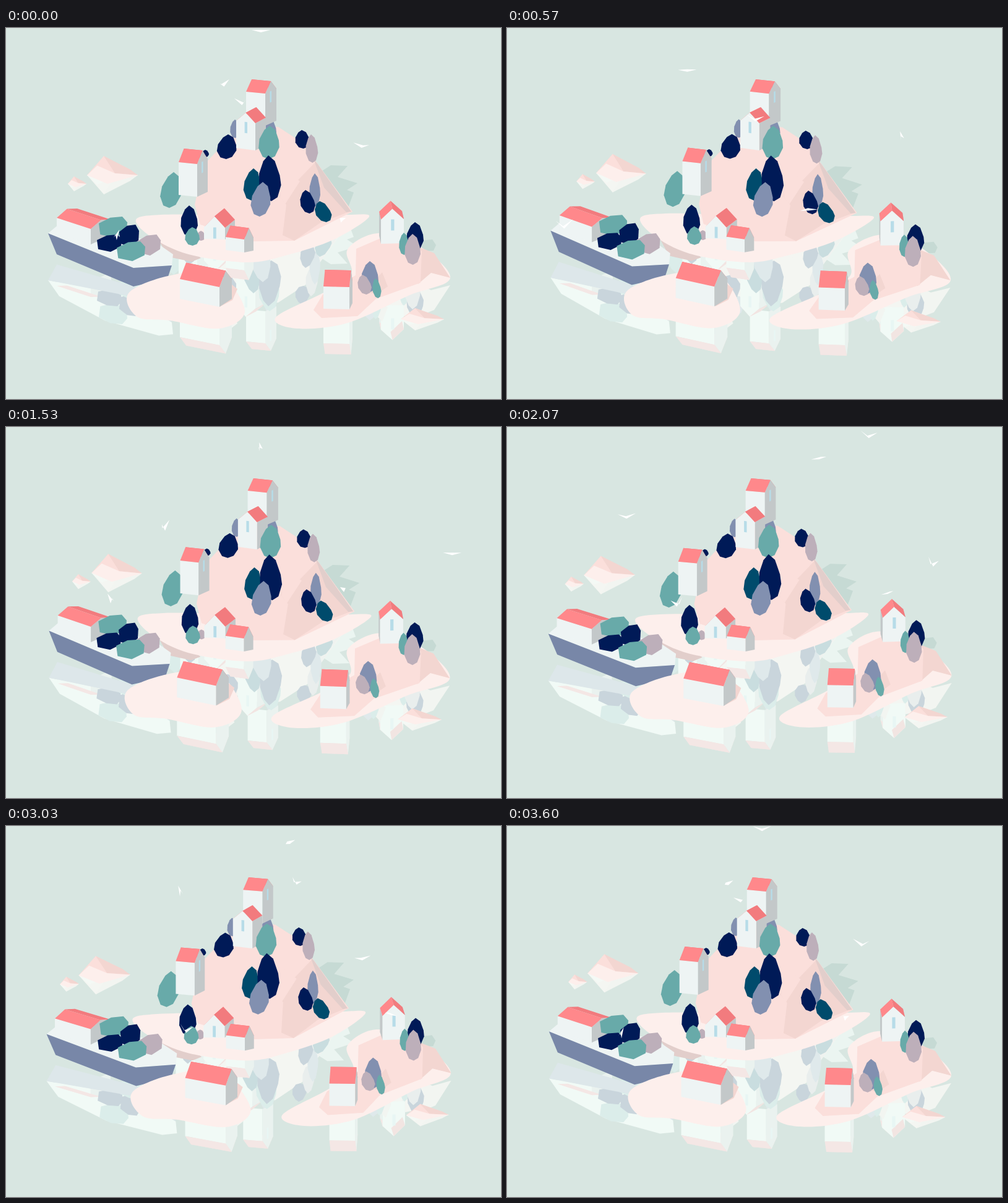
These frames come from a looping animation (800x600 px, 3.63 s). An HTML page with a canvas:

```html
<!DOCTYPE html>
<html lang="en">
<meta charset="utf-8">
<title>Islands</title>
<style>
  html, body { margin: 0; width: 100%; height: 100%; overflow: hidden; background: #d8e6e1 }
  canvas { display: block }
</style>
<canvas id="stage" width="800" height="600"></canvas>
<script>
const ctx = document.getElementById('stage').getContext('2d');
const LOOP = 3630, WATER = '#d8e6e1', PALE = '#f2fbf7';
const C = {
  sand: '#fdefec', hill: '#fbdfdb', shade: '#f3d6d1', dusk: '#e2cecb', roof: '#ff888b', roofDark: '#f27b7e',
  wall: '#eef4f4', side: '#c3c8c9', window: '#b7dce8', navy: '#001a57', teal: '#68aaa9',
  slate: '#8290b0', mauve: '#bdafba', deep: '#004b6c', hull: '#7887a8', haze: '#c6dad4'
};

// Every vertex is [x, g, h]: g is the screen line of the water below it, h its height above that line
const faces = [];
const face = (color, points, smooth = false) => faces.push({
  color: C[color], reflection: mix(C[color], PALE, .83), points, smooth,
  raised: points.some(p => p[2] > 0)
});

function mix(a, b, amount) {
  const channel = (hex, i) => parseInt(hex.substr(1 + 2 * i, 2), 16);
  return `rgb(${[0, 1, 2].map(i => Math.round(channel(a, i) * (1 - amount) + channel(b, i) * amount))})`;
}

const pairs = text => text.split(' ').map(pair => pair.split(',').map(Number));

// Outline drawn on screen, standing on a waterline that may slope with x
function poly(color, line, text, slope = 0) {
  const outline = pairs(text), left = outline[0][0];
  face(color, outline.map(([x, y]) => {
    const g = Math.max(y, line + slope * (x - left));
    return [x, g, g - y];
  }));
}
const island = text => face('sand', pairs(text).map(([x, y]) => [x, Math.max(y, 302), 0]), true);

// Unit silhouettes scaled into place
const EGG = pairs('0,-1 .55,-.76 .93,-.12 1,.3 .62,.83 .05,1 -.55,.86 -.97,.35 -.92,-.2 -.48,-.75');
const CRATE = pairs('-1,-.35 -.2,-.9 .65,-1 1,-.45 .95,.4 .1,1 -.9,.7');
const stamp = (shape, color, line, x, y, rx, ry, lean = 0) =>
  face(color, shape.map(([u, v]) => [x + u * rx - v * lean, line, line - y - v * ry]));
const tree = (...args) => stamp(EGG, ...args);
const crate = (color, ...args) => stamp(CRATE, color, 392, ...args);

// Gabled box from its near corner; `long` runs along the ridge, `gable` across it
function house(x, y, lift, long, gable, wall, rise, window = true, gableLit = false) {
  const at = (l, w, h) => [x + l * long[0] + w * gable[0], y + lift + l * long[1] + w * gable[1], lift + h];
  const [longColor, gableColor] = gableLit ? ['side', 'wall'] : ['wall', 'side'];
  const top = wall + rise;
  if (long[0] * gable[0] > 0) face('side', [at(0, 1, 0), at(1, 1, 0), at(1, 1, wall), at(0, 1, wall)]);
  face(gableLit ? 'roof' : 'roofDark', [at(0, 1, wall), at(1, 1, wall), at(1, .5, top), at(0, .5, top)]);
  face(longColor, [at(0, 0, 0), at(1, 0, 0), at(1, 0, wall), at(0, 0, wall)]);
  face(gableColor, [at(0, 0, 0), at(0, 1, 0), at(0, 1, wall), at(0, .5, top), at(0, 0, wall)]);
  face(gableLit ? 'roofDark' : 'roof', [at(0, 0, wall), at(1, 0, wall), at(1, .5, top), at(0, .5, top)]);
  if (window) {
    const low = wall - 18, high = wall;
    face('window', [at(0, .42, low), at(0, .56, low), at(0, .56, high), at(0, .42, high)]);
  }
}

function rock(x, y, w, rise) {
  const at = (u, v) => [x + u * w, y, -v * rise];
  face('hill', [at(-1, 0), at(-.34, -1), at(1, 0)]);
  face('shade', [at(-.34, -1), at(.7, -.3), at(1, 0), at(.1, -.1)]);
  face('sand', [at(-1, 0), at(-.6, -.5), at(.1, -.1), at(1, 0), at(-.2, .45)]);
}

rock(172, 238, 41, 31);
rock(115, 252, 15, 12);

// Main island
poly('haze', 302, '500,238 525,222 552,223 536,241 568,251 551,262 562,266 553,290');
poly('dusk', 355, '245,340 290,351 315,372 300,378 262,370');
island('210,310 250,279 345,240 490,225 548,289 587,305 530,342 455,367 390,379 295,366 235,338');
poly('hill', 302, '319,222 372,166 412,158 440,160 486,190 501,216 560,297 466,344 400,345 314,318 305,286');
poly('shade', 302, '443,225 470,248 499,218 555,297 508,315 466,344 447,335 453,286 442,272');
poly('hill', 302, '440,220 475,248 451,285 443,273');
poly('dusk', 302, '497,212 503,219 558,297 550,298 514,258');
tree('navy', 308, 322, 203, 6, 6);
tree('slate', 306, 370, 163, 8, 15);
tree('slate', 306, 427, 164, 10, 16);
house(419, 158, 150, [-31, -3], [18, -8], 52, 16);
tree('navy', 306, 357, 192, 16, 20, 2);
house(403, 198, 106, [17, -9], [-31, -4], 44, 15, true, true);
tree('teal', 308, 425, 185, 17, 27, 1);
tree('navy', 306, 479, 180, 12, 15, -1);
tree('mauve', 303, 494, 195, 10, 23, -1);
tree('teal', 316, 267, 262, 17, 29, 4);
house(309, 273, 42, [-30, -3], [17, -8], 53, 18);
tree('deep', 328, 398, 253, 14, 26, 2);
tree('navy', 328, 426, 243, 18, 37, -2);
tree('slate', 330, 412, 277, 16, 28, 3);
tree('slate', 325, 499, 262, 9, 27);
tree('navy', 325, 487, 281, 12, 19, -3);
tree('deep', 325, 512, 297, 13, 17, -5);
tree('navy', 335, 296, 312, 14, 25);
tree('mauve', 344, 315, 336, 7, 8);
tree('teal', 342, 301, 337, 12, 15);
house(354, 342, 8, [16, -13], [-34, -1], 19, 18, true, true);
house(385, 363, 4, [-30, -4], [15, -3], 21, 17, false);

// Right island
rock(673, 471, 35, 18);
poly('haze', 380, '670,344 689,342 695,351 691,360 672,361');
island('552,358 600,332 664,350 718,404 650,433 552,477 470,486 436,468 515,427 558,398');
poly('shade', 410, '662,352 692,364 718,404 687,396 666,414');
poly('hill', 405, '566,357 610,338 655,346 672,361 670,412 598,438 568,466 510,469 497,456 512,431 565,400');
tree('navy', 392, 661, 337, 14, 23);
house(643, 348, 50, [-3, -13], [-37, 1], 39, 17, true, true);
tree('teal', 390, 643, 349, 8, 18);
tree('mauve', 394, 657, 358, 13, 25);
poly('shade', 435, '580,427 600,430 617,418 608,395');
tree('slate', 425, 588, 402, 14, 25);
tree('mauve', 430, 579, 415, 11, 16, -3);
tree('teal', 438, 599, 421, 7, 16, -2);
house(555, 455, 10, [-42, -1], [5, -10], 36, 22, false);

// Boat
poly('wall', 370, '68,332 86,317 160,322 247,350 270,366 268,384 206,388', .3);
house(137, 350, 30, [-55, -18], [33, -15], 25, 7, false);
crate('teal', 173, 322, 23, 17);
crate('mauve', 231, 351, 19, 17);
crate('navy', 167, 348, 20, 14);
crate('navy', 199, 336, 16, 18);
crate('teal', 202, 361, 23, 16);
poly('hull', 370, '68,332 206,388 268,384 261,405 206,418 82,366', .3);

// Front island
island('198,429 262,401 342,397 386,457 345,486 265,473 212,467');
poly('shade', 450, '345,451 366,440 374,422 361,412');
house(345, 451, 15, [-64, -13], [20, -13], 32, 20, false);

// The whole scene swings gently around the vertical axis, with slight perspective at the edges
function project([x, g, h], sway, mirror) {
  const dx = x - 400;
  return [x + sway * .108 * (356 - g + dx * dx / 2700), g + sway * .0155 * dx + (mirror ? h : -h)];
}

function fill(points, smooth) {
  const at = i => points[(i + points.length) % points.length];
  ctx.beginPath();
  ctx.moveTo(...at(0));
  points.forEach((p, i) => {
    const [a, b, c] = [at(i - 1), at(i + 1), at(i + 2)];
    if (smooth) ctx.bezierCurveTo(
      p[0] + (b[0] - a[0]) / 6, p[1] + (b[1] - a[1]) / 6,
      b[0] - (c[0] - p[0]) / 6, b[1] - (c[1] - p[1]) / 6, ...b);
    else ctx.lineTo(...b);
  });
  ctx.fill();
}

// Birds circle clockwise; wings point along the radius of the circle and beat up and down
const BIRDS = [
  { x: 502, y: 4, r: 90, start: 90 }, { x: 409, y: 66, r: 118, start: 30 },
  { x: 298, y: 139, r: 108, start: 232 }, { x: 643, y: 203, r: 78, start: 121 },
  { x: 564, y: 285, r: 81, start: 16 }, { x: 203, y: 311, r: 119, start: 13 }
];
function bird({ x, y, r, start }, turn) {
  const a = turn + start * Math.PI / 180, sin = Math.sin(a), cos = Math.cos(a);
  const bx = x - r * sin, by = y + (12 + r * .15) * cos;
  const lift = 4 + 7 * Math.cos(turn * 12 + start);
  const wing = side => [bx - side * 15 * sin + 4 * cos, by + side * 4 * cos - lift];
  fill([wing(1), [bx - 2 * cos, by - 1], wing(-1), [bx + 3 * cos, by + 3]]);
}

function draw(now) {
  const turn = now / LOOP * 2 * Math.PI, sway = Math.sin(turn);
  ctx.fillStyle = WATER;
  ctx.fillRect(0, 0, 800, 600);
  for (const mirror of [true, false])
    for (const f of faces) {
      if (mirror && !f.raised) continue;
      ctx.fillStyle = mirror ? f.reflection : f.color;
      fill(f.points.map(p => project(p, sway, mirror)), f.smooth);
    }
  ctx.fillStyle = '#fff';
  BIRDS.forEach(b => bird(b, turn));
}

const begin = performance.now();
function frame() {
  draw((performance.now() - begin) % LOOP);
  requestAnimationFrame(frame);
}
frame();
</script>
</html>
```
